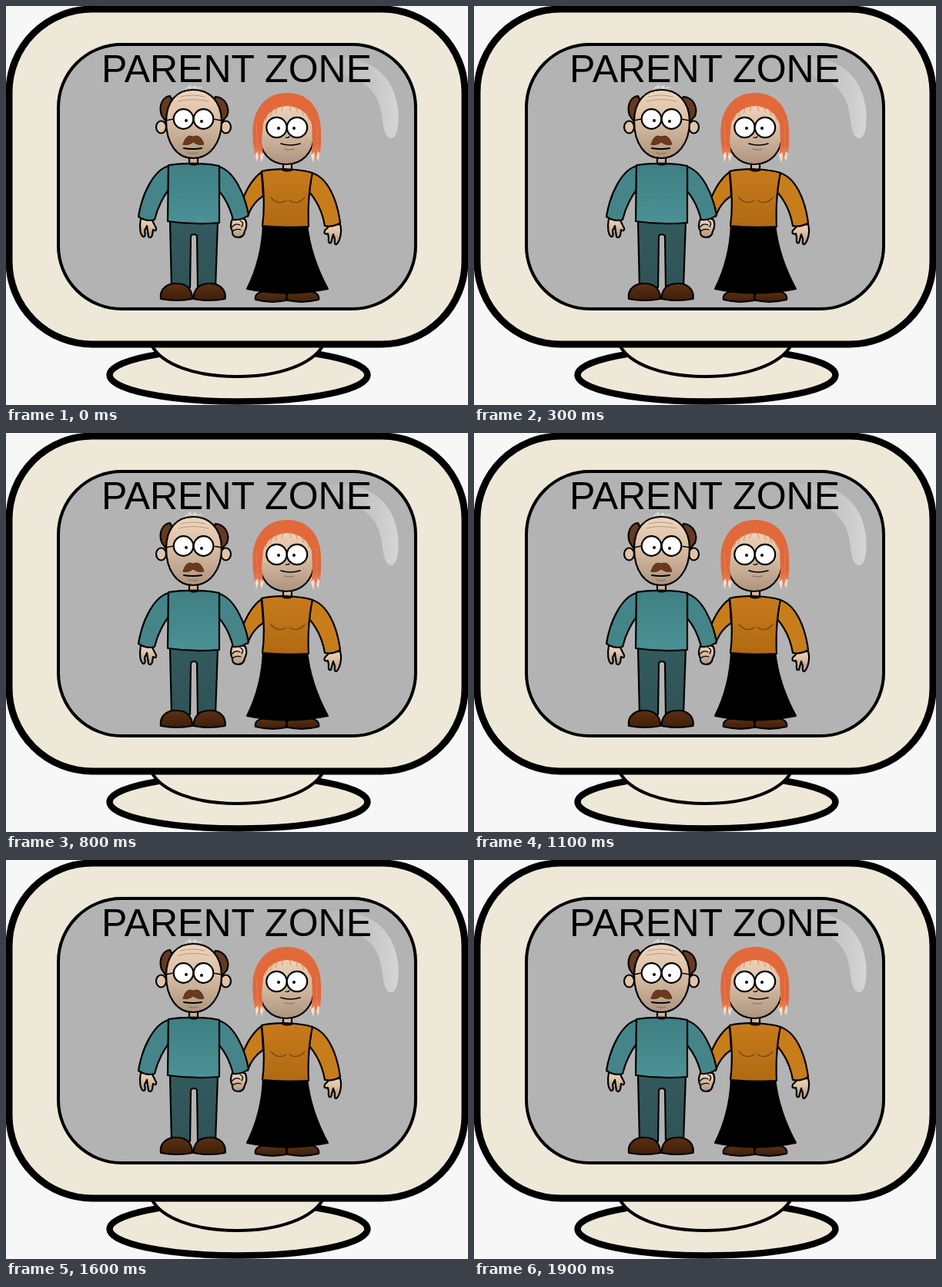
An HTML page that plays this animation: 600x519 px, repeating every 2.1 s.

```html
<!DOCTYPE html>
<html lang="en">
<head>
<meta charset="utf-8">
<title>Parent Zone</title>
<style>
html, body { margin: 0; width: 100%; height: 100%; overflow: hidden; background: #f7f7f7; }
svg { display: block; width: 100%; height: 100%; }
text { font: 50px "Liberation Sans", Arial, sans-serif; }
.ink { stroke: #000; stroke-width: 2.2; stroke-linejoin: round; stroke-linecap: round; }
.line { fill: none; }
.case { fill: #eee8d8; }
.thin { stroke-width: 1.3; }
.soft { stroke: #806b59; stroke-width: 1.2; }
</style>
</head>
<body>
<svg viewBox="0 0 600 519">
  <defs>
    <linearGradient id="skin" x1="0" y1="0" x2="0" y2="1">
      <stop offset="0" stop-color="#eed5bc"/><stop offset=".4" stop-color="#dcc1a7"/><stop offset="1" stop-color="#ad947e"/>
    </linearGradient>
    <linearGradient id="teal" x1="0" y1="0" x2="0" y2="1">
      <stop offset="0" stop-color="#3f7f83"/><stop offset="1" stop-color="#4b9195"/>
    </linearGradient>
    <linearGradient id="slacks" x1="0" y1="0" x2="0" y2="1">
      <stop offset="0" stop-color="#325a5d"/><stop offset="1" stop-color="#305356"/>
    </linearGradient>
    <linearGradient id="amber" x1="0" y1="0" x2="0" y2="1">
      <stop offset="0" stop-color="#c77a1c"/><stop offset="1" stop-color="#b06a12"/>
    </linearGradient>
    <linearGradient id="hair" x1="0" y1="0" x2="0" y2="1">
      <stop offset="0" stop-color="#e3693a"/><stop offset=".75" stop-color="#de683c"/><stop offset="1" stop-color="#ef9168"/>
    </linearGradient>
    <linearGradient id="shoe" x1="0" y1="0" x2="0" y2="1">
      <stop offset="0" stop-color="#5b3114"/><stop offset="1" stop-color="#3f1e08"/>
    </linearGradient>
    <linearGradient id="shine" x1="0" y1="0" x2="1" y2="0">
      <stop offset="0" stop-color="#d4d4d4" stop-opacity="0"/><stop offset=".6" stop-color="#d0d0d0" stop-opacity=".6"/><stop offset="1" stop-color="#d6d6d6"/>
    </linearGradient>
  </defs>

  <!-- monitor -->
  <g stroke="#000">
    <ellipse class="case" cx="302" cy="480" rx="167.500" ry="34.500" stroke-width="8.500"/>
    <path class="case" d="M189 441C202 466 245 482 300 482S398 466 412 441" stroke-width="4"/>
    <rect class="case" x="4" y="4" width="592" height="436" rx="108" stroke-width="9"/>
    <rect x="68" y="50" width="464" height="344" rx="82" fill="#b3b3b3" stroke-width="4"/>
  </g>
  <path d="M404 69C454 60 502 76 509 134C511 154 508 172 500 172C492 172 490 157 488 142C485 116 470 98 440 90Z" fill="url(#shine)"/>
  <text x="124" y="99">PARENT ZONE</text>

  <!-- woman -->
  <g class="ink">
    <path fill="url(#skin)" d="M360 203V215H371V203Z"/>
    <path fill="url(#shoe)" d="M324 382Q322 373 336 371H362Q366 378 364 383Q344 387 324 382Z"/>
    <path fill="url(#shoe)" d="M406 382Q408 373 394 371H368Q362 378 366 383Q386 387 406 382Z"/>
    <path fill="url(#skin)" d="M434 284C437 295 433 307 429 310Q426 311 427 303L425 297L422 308Q418 310 419 301L418 296Q412 298 414 292L421 285Z"/>
    <path fill="#c87d1b" d="M332 216C319 225 308 245 304 263Q308 272 314 274Q319 257 334 247Z"/>
    <path fill="#c87d1b" d="M397 217C418 223 430 252 434 282Q425 288 414 286Q410 261 394 242Z"/>
    <path fill="#000" d="M334 284C333 314 325 344 313 368Q365 379 418 368C404 342 394 314 391 284Z"/>
    <path fill="url(#amber)" d="M332 215C350 211 378 211 398 217C393 240 392 265 393 287Q362 289 333 286C336 265 335 240 332 215Z"/>
    <path class="line" d="M359 213Q365 216 372 213"/>
    <path class="line" style="stroke:#75460e;stroke-width:1.2" d="M344 249Q353 260 364 253M368 253Q379 260 388 249"/>
  </g>
  <path fill="#f5ded0" d="M323 186L325 203L329 193L332 203L336 190ZM394 188L399 204L401 194L406 202L408 184Z"/>
  <path class="ink" fill="url(#skin)" d="M364 124C341 124 329 144 329 167C329 191 344 206 364 206S400 191 400 167C400 144 388 124 364 124Z"/>
  <path fill="url(#hair)" d="M365 113C342 113 326 127 321 153C319 170 322 185 323 194L327 189L329 202L331 190L334 194L332 175L334 153C338 140 349 131 365 130C382 131 393 140 397 154L398 178L396 194L400 190L402 202L405 189L408 192C410 174 410 155 406 142C399 122 384 113 365 113Z"/>
  <path class="line" stroke="#e58a5f" d="M341 139L337 149M347 134L343 144M353 131L350 140M360 129L358 137M368 129L370 137M376 131L379 139M383 134L387 143M390 140L394 149"/>
  <path class="line" stroke="#ec8558" stroke-width=".7" d="M325 153L327 186M404 150L403 188"/>
  <g class="ink line">
    <path class="thin" d="M363 171Q366 172 368 170"/>
    <path d="M357 179Q369 183 382 179" stroke-width="1.700"/>
    <path class="soft" d="M362 186Q368 188 374 186"/>
  </g>
  <g id="woman"></g>

  <!-- man -->
  <g class="ink">
    <path fill="url(#skin)" d="M238 194V206H249V194Z"/>
    <path fill="url(#slacks)" d="M213 280L215 366H239L240 299Q244 295 248 299L249 366H272L275 280Z"/>
    <path id="boot" fill="url(#shoe)" d="M201 381C199 367 211 360 222 361C236 361 242 370 242 381Q222 385 201 381Z"/>
    <use href="#boot" transform="matrix(-1 0 0 1 485.500 0)"/>
    <path fill="url(#skin)" d="M175 277C173 287 174 297 178 300Q182 301 180 292L183 286L185 300Q188 303 190 298L191 291Q196 294 195 289L189 277Z"/>
    <path fill="url(#skin)" d="M294 277Q290 286 294 293Q293 300 301 301Q309 301 310 293Q314 286 311 278Q302 273 294 277Z"/>
    <path class="line thin" d="M294 287Q298 282 304 285M294 293Q299 289 305 291M304 279Q310 282 306 287"/>
    <path fill="#458589" d="M211 208C193 213 177 242 172 274Q182 281 193 278Q198 257 211 239Z"/>
    <path fill="#458589" d="M277 209C296 215 310 244 315 272Q306 279 295 278Q289 255 277 241Z"/>
    <path fill="url(#teal)" d="M211 207C230 204 258 204 277 208V282Q243 285 210 280Z"/>
    <path class="line" d="M238 205Q244 208 250 205"/>
    <path fill="#663920" d="M213 117C203 118 198 130 202 142L208 151L217 125Z"/>
    <path fill="#663920" d="M272 118C285 119 291 132 287 143L280 151L269 126Z"/>
    <ellipse fill="#dfc4aa" cx="201.500" cy="157.500" rx="6.500" ry="8"/>
    <ellipse fill="#dfc4aa" cx="285.500" cy="157.500" rx="6.500" ry="8"/>
    <path fill="url(#skin)" d="M243 109C222 109 208 124 208 150C208 179 222 198 243 198S280 179 280 150C280 124 264 109 243 109Z"/>
    <path class="line" style="stroke:#b59a82;stroke-width:1" d="M227 118Q242 114 258 118M224 124Q242 119 263 124"/>
    <path class="line" style="stroke:#e2e2e2;stroke-width:1.2" d="M233 108L240 103L238 107L247 104L244 107L255 106"/>
    <path class="line thin" d="M208 149L217 147M269 147L280 149"/>
    <path fill="#6b3a1c" style="stroke:#4b260f;stroke-width:.8" d="M230 180Q233 169 239 169L243 170L247 169Q254 169 257 180Q250 182 243 177Q237 182 230 180Z"/>
    <path class="line" d="M231 185Q243 187 254 185"/>
    <path class="line soft" d="M237 191Q243 193 249 191"/>
  </g>
  <g id="man"></g>
</svg>
<script>
const LOOP = 2100;
const byId = id => document.getElementById(id);
const man = byId("man"), woman = byId("woman");

const ring = (x, y, r, fill) =>
  `<circle class="ink" cx="${x}" cy="${y}" r="${r}" fill="${fill}"/>`;
const openEye = (x, y, r, px, py) =>
  ring(x, y, r, "#fff") + `<circle cx="${px}" cy="${py}" r="2"/>`;
const lid = (x, y, w, h) =>
  `<path class="ink line" style="stroke-width:1.7" d="M${x - w} ${y}C${x - w + 2} ${y + h} ${x + w - 2} ${y + h} ${x + w} ${y}"/>`;
const lashes = (x, y) =>
  `<path class="ink line" style="stroke-width:.8" d="M${x - 5} ${y + 3}l-2 3M${x} ${y + 5}v3M${x + 5} ${y + 3}l2 3"/>`;

const manOpen = openEye(230.5, 147, 12.8, 234, 149) + openEye(256.5, 147, 12.8, 254, 150);
const manShut = [230.5, 256.5].map(x =>
  ring(x, 147, 12.8, "#dcc2a8") + lid(x, 147, 8, 6) + lashes(x, 147)).join("");
const womanOpen = openEye(351.5, 158, 13.2, 354, 159) + openEye(378, 158, 13.2, 374, 159);
const womanShut = [351, 378].map(x => lid(x, 159, 13, 17)).join("");

function show(group, markup) {
  if (group.shown === markup) return;
  group.shown = markup;
  group.innerHTML = markup;
}

function draw(now) {
  const t = now % LOOP;
  show(man, t >= 500 && t < 800 ? manShut : manOpen);
  show(woman, t >= 1300 && t < 1600 ? womanShut : womanOpen);
}

const start = performance.now();
function tick() {
  draw(performance.now() - start);
  requestAnimationFrame(tick);
}
tick();
</script>
</body>
</html>
```
